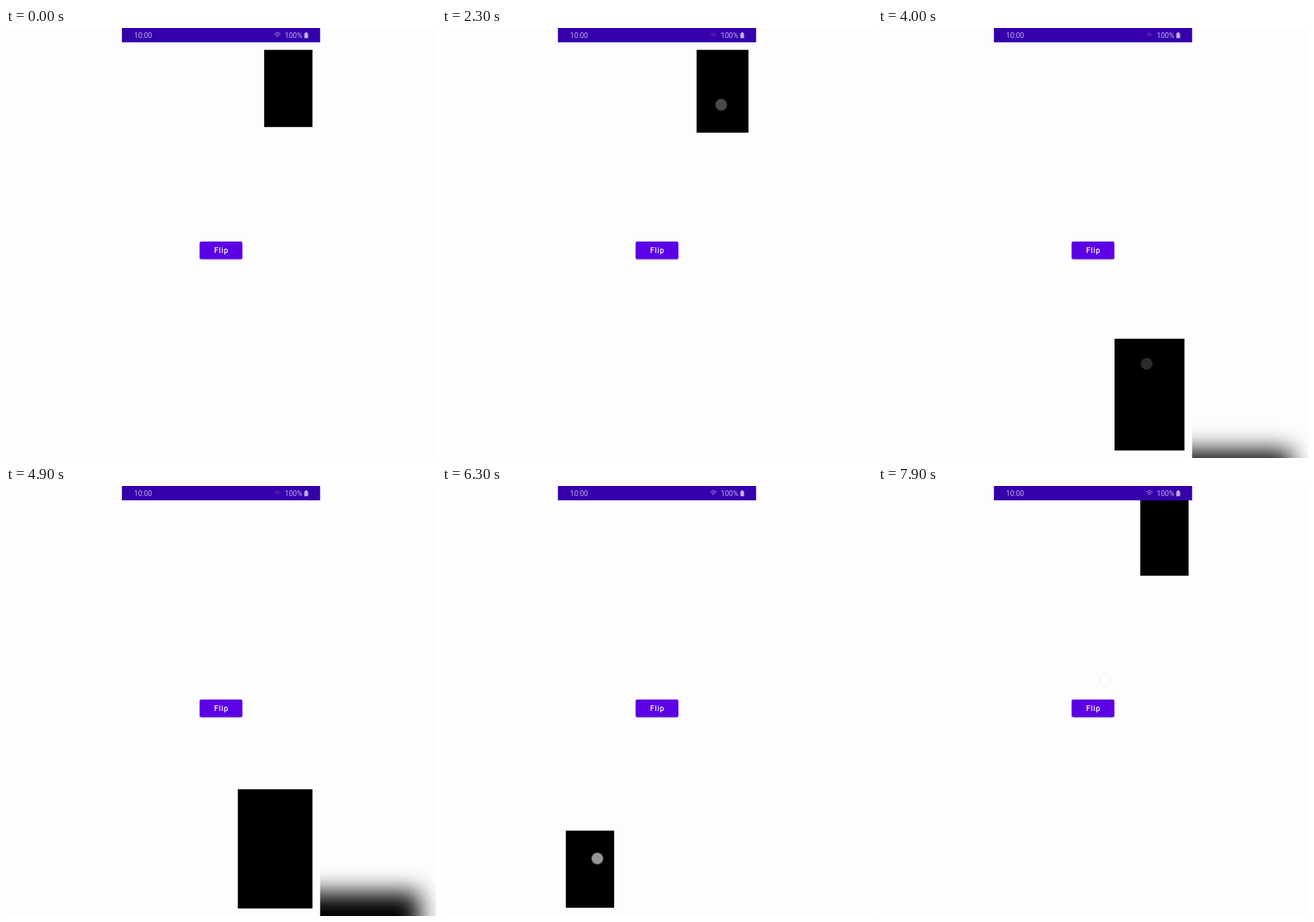
Animation of 600x600 px, one loop 8000 ms. Source, as an HTML page:

```html
<!DOCTYPE html>
<html lang="en">
<head>
<meta charset="utf-8">
<title>Floating window</title>
<style>
  html, body { margin: 0; width: 100%; height: 100%; overflow: hidden; background: #fefdfe; }
  svg { display: block; width: 100vw; height: 100vh; }
  text { font-family: Roboto, sans-serif; font-size: 10px; }
</style>
</head>
<body>
<svg viewBox="0 0 600 600">
  <defs>
    <filter id="soft" filterUnits="userSpaceOnUse" x="-100" y="-100" width="800" height="800" color-interpolation-filters="sRGB">
      <feGaussianBlur stdDeviation="16"/>
    </filter>
    <filter id="lift" x="-20%" y="-30%" width="140%" height="180%">
      <feDropShadow dx="0" dy=".6" stdDeviation=".8" flood-color="#000" flood-opacity=".35"/>
    </filter>
  </defs>
  <rect width="600" height="600" fill="#fefdfe"/>
  <g filter="url(#soft)"><rect id="far"/></g>
  <rect x="161.7" width="276.6" height="600" fill="#fefdfe"/>
  <rect id="near"/>
  <rect x="270.3" y="298" width="59.4" height="24.6" rx="2" fill="#5b00e6" filter="url(#lift)"/>
  <text x="290.4" y="314.2" fill="#fff" font-weight="500" letter-spacing=".9" style="font-size:10.2px">Flip</text>
  <rect x="161.7" width="276.6" height="20" fill="#3500ac"/>
  <g fill="#c2b0e8">
    <text x="178.8" y="13.7">10:00</text>
    <text x="389.1" y="13.7">100%</text>
    <path d="M416.3 7.3h1.4v-1.2h2.4v1.2h1.4v6.9h-5.2z"/>
  </g>
  <g id="wifi" fill="none" stroke="#a58cdc" stroke-width="1">
    <path d="M374.3 8.4q4.5-3.6 9 0M375.8 10.2q3-2.4 6 0M377.3 11.9q1.5-1.2 3 0"/>
  </g>
  <path id="wifiDim" d="M373.8 8.2q5-3.8 10 0l-5 5.2z" fill="#5312ad"/>
  <g id="dot">
    <circle r="8.6" fill="none" stroke="#777" stroke-opacity=".3" stroke-width="1.2"/>
    <circle r="7.4" fill="#fff" fill-opacity=".58" stroke="#d0d0d0" stroke-opacity=".5" stroke-width="1.2"/>
  </g>
</svg>
<script>
const LOOP = 8000, W = 67.4, H = 107.7, BIG = 1.6, FADE = 200;
const LEFT = 172.4, RIGHT = 427.6, TOP = 30.5, BOTTOM = 589.5;
const PHONE_X = 161.7, ZOOM = 600 / 276.6;
const $ = id => document.getElementById(id);

const ease = {
  line: p => p,
  swing: p => (1 - Math.cos(Math.PI * p)) / 2,
  out: p => 1 - (1 - p) ** 3,
  fling: p => 1 - (1 - p) ** 4
};

// Window docked in a corner at a given scale.
const dock = (right, bottom, s) => [right ? RIGHT - W * s : LEFT, bottom ? BOTTOM - H * s : TOP, s];
const topRight = s => dock(1, 0, s), bottomRight = s => dock(1, 1, s), bottomLeft = s => dock(0, 1, s);

// [time, [x, y, scale], easing towards this pose]
const poses = [
  [0, topRight(1)],
  [400, topRight(1)], [700, topRight(BIG), 'swing'],
  [1190, topRight(BIG)], [1490, topRight(1), 'swing'],
  [2233, topRight(1)], [2533, topRight(BIG), 'swing'],
  [2780, topRight(BIG)], [3100, [274, 290, BIG], 'swing'], [3130, [270, 302, BIG]],
  [3340, [324, 424, BIG], 'out'], [3510, bottomRight(BIG), 'swing'],
  [3900, bottomRight(BIG)], [4200, bottomRight(1), 'swing'],
  [4660, bottomRight(1)], [4960, bottomRight(BIG), 'swing'],
  [5000, bottomRight(BIG)], [5250, [192, 361, BIG], 'swing'],
  [5400, [166.9, 424.6, BIG], 'out'], [5540, bottomLeft(BIG), 'swing'],
  [5800, bottomLeft(BIG)], [6100, bottomLeft(1), 'swing'],
  [6280, bottomLeft(1)], [6790, [262, 250, 1], 'swing'],
  [6900, [230.2, 329.7, 1]], [7080, [168.5, 488, 1], 'out'], [7220, bottomLeft(1), 'swing'],
  [7450, bottomLeft(1)], [7740, [277, 230, 1], 'swing'],
  [7900, [366, 17.5, 1], 'fling'], [8050, topRight(1), 'swing']
];

// [down, up, x, y] for taps; [down, up, dx, dy, true] for drags held relative to the window.
const touches = [
  [290, 370, 389, 107], [990, 1150, 389, 107], [1990, 2200, 389.5, 107],
  [2780, 3120, 31, 52, true],
  [3790, 3860, 375, 468.5], [4590, 4640, 388, 500], [5000, 5250, 68, 83, true],
  [5620, 5770, 222, 510],
  [6280, 6790, 44, 39, true], [7450, 7740, 40, 40.5, true]
];

function poseAt(t) {
  const i = poses.findIndex(k => k[0] > t);
  const [t0, a] = poses[i - 1], [t1, b, kind = 'line'] = poses[i];
  const p = ease[kind]((t - t0) / (t1 - t0));
  return a.map((v, n) => v + (b[n] - v) * p);
}

function box(el, x, y, w, h) {
  Object.entries({ x, y, width: w, height: h }).forEach(([k, v]) => el.setAttribute(k, v));
}

function drawTouch(t) {
  const hit = touches.find(([down, up]) => t >= down && t < up + FADE);
  const dot = $('dot');
  if (!hit) return dot.setAttribute('opacity', 0);
  const [, up, dx, dy, drag] = hit;
  const [x, y] = drag ? poseAt(Math.min(t, up)) : [0, 0];
  dot.setAttribute('transform', `translate(${x + dx} ${y + dy})`);
  dot.setAttribute('opacity', t < up ? 1 : 1 - (t - up) / FADE);
}

function draw(t) {
  const [x, y, s] = poseAt(t);
  const w = W * s, h = H * s;
  box($('near'), x, y, w, h);
  box($('far'), (x - PHONE_X) * ZOOM, (y - 300) * ZOOM + 300, w * ZOOM, h * ZOOM);
  const dim = t >= 400 && t < 6000;
  $('wifi').setAttribute('opacity', dim ? 0 : 1);
  $('wifiDim').setAttribute('opacity', dim ? 1 : 0);
  drawTouch(t);
}

const start = performance.now();
function tick() {
  draw((performance.now() - start) % LOOP);
  requestAnimationFrame(tick);
}
tick();
</script>
</body>
</html>
```
